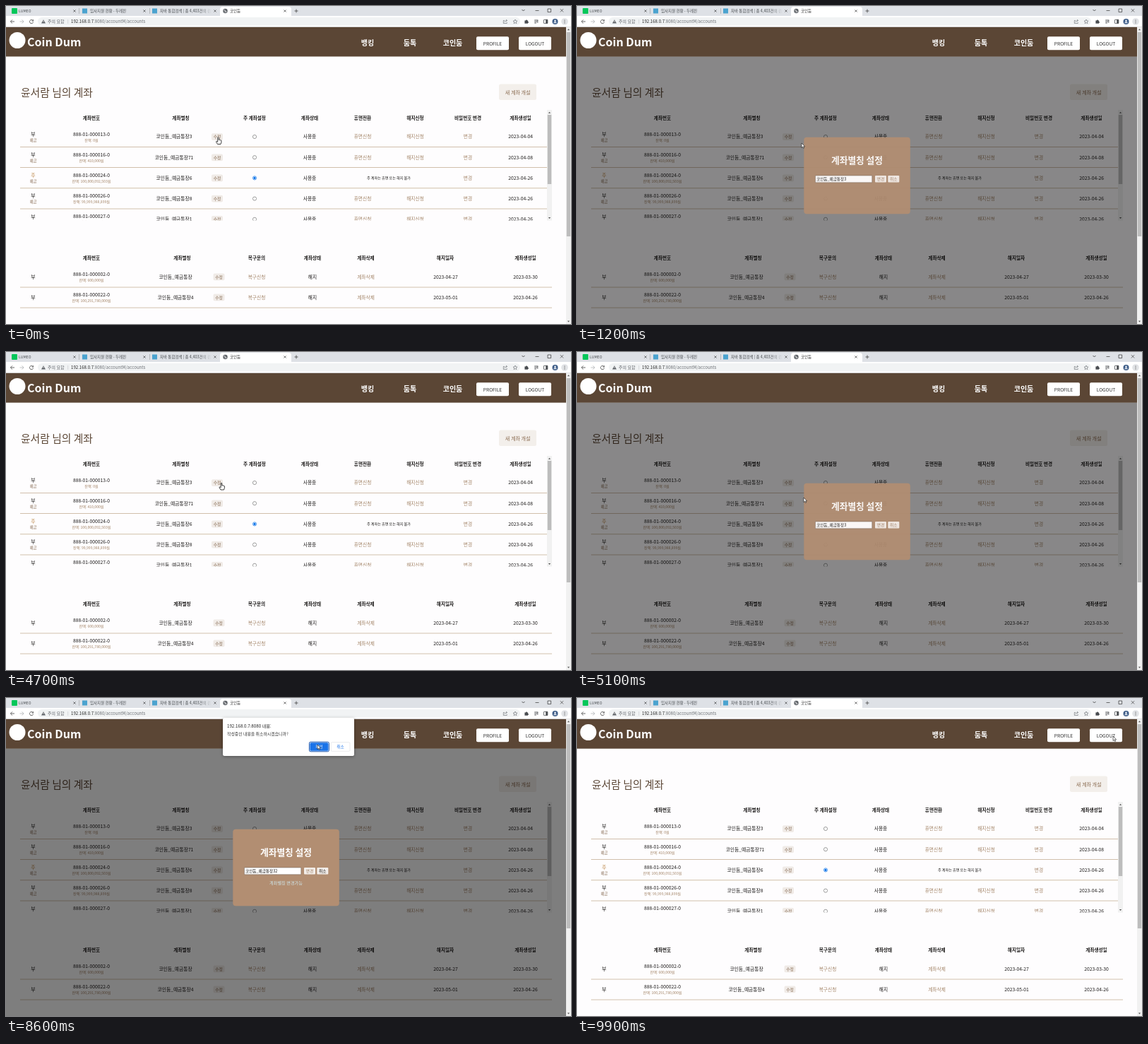
An HTML page with a canvas that plays this animation: 800x450 px, repeating every 10000 ms.

```html
<!DOCTYPE html>
<html lang="ko">
<head>
<meta charset="utf-8">
<title>코인둠</title>
<style>
html, body { margin: 0; width: 100%; height: 100%; overflow: hidden; background: #fff; }
canvas { display: block; width: 800px; height: 450px; }
</style>
</head>
<body>
<canvas id="stage"></canvas>
<script>
const cv = document.getElementById('stage');
const g = cv.getContext('2d');
const dpr = window.devicePixelRatio || 1;
cv.width = 800 * dpr;
cv.height = 450 * dpr;

const LOOP = 10000, STEP = 100;
const FONT = '"Noto Sans CJK KR","Noto Sans CJK JP","Noto Sans CJK SC",sans-serif';
const INK = '#1c1a19', BROWN = '#5b4635', TAN = '#a38467', GRAY = '#5f6368', BLUE = '#1a73e8';
const BRAND = '코인둠', ALIAS = BRAND + '_예금통장';

function text(s, x, y, size, color = INK, align = 'center', weight = 400) {
  g.font = `${weight} ${size}px ${FONT}`;
  g.textAlign = align;
  g.fillStyle = color;
  g.fillText(s, x, y + size * 0.37);
}
const left = (s, x, y, size, color, weight) => text(s, x, y, size, color, 'left', weight);
const bold = (s, x, y, size, color) => text(s, x, y, size, color, 'center', 700);

function rect(x, y, w, h, color) {
  g.fillStyle = color;
  g.fillRect(x, y, w, h);
}
function box(x, y, w, h, r, fill, edge, lw = 0.6) {
  g.beginPath();
  g.roundRect(x, y, w, h, r);
  if (fill) { g.fillStyle = fill; g.fill(); }
  if (edge) { g.strokeStyle = edge; g.lineWidth = lw; g.stroke(); }
}
function disc(x, y, r, fill, edge, lw = 0.7) {
  g.beginPath();
  g.arc(x, y, r, 0, 7);
  if (fill) { g.fillStyle = fill; g.fill(); }
  if (edge) { g.strokeStyle = edge; g.lineWidth = lw; g.stroke(); }
}
function path(d, x, y, edge, lw = 0.8, fill) {
  const p = new Path2D(d);
  g.save();
  g.translate(x, y);
  if (fill) { g.fillStyle = fill; g.fill(p); }
  if (edge) { g.strokeStyle = edge; g.lineWidth = lw; g.lineJoin = 'round'; g.stroke(p); }
  g.restore();
}
const cross = (x, y, r) => path(`M${-r} ${-r}L${r} ${r}M${r} ${-r}L${-r} ${r}`, x, y, '#444', 0.7);

function browser() {
  rect(0, 0, 800, 15, '#dee1e6');
  box(303, 1, 101, 18, 4, '#fff');
  rect(0, 14, 800, 15.5, '#fff');
  rect(0, 29, 800, 0.6, '#d5d7da');
  box(8, 3, 8, 8, 1, '#03c75a');
  left('LUMEO', 18, 7, 5.2, '#45494d');
  for (const x of [108, 207]) rect(x, 3.5, 7, 7, '#4ba3cf');
  left('입사지원 현황 - 두레핀', 119, 7, 5.5, '#45494d');
  const fade = g.createLinearGradient(276, 0, 291, 0);
  fade.addColorStop(0, '#45494d');
  fade.addColorStop(1, '#45494d00');
  left('자바 통합검색 | 총 4,403건의 검', 218, 7, 5.5, fade);
  disc(310.5, 7, 3.2, GRAY);
  path('M-2 -1Q0 -2 0 0T2 1M-1 2L0 1', 310.5, 7, '#fff', 0.8);
  left(BRAND, 317, 7, 5.5, '#333');
  for (const x of [97, 196, 296, 395]) cross(x, 7, 1.6);
  for (const x of [103, 203]) rect(x, 3, 0.6, 8, '#9a9da1');
  path('M-2.5 0H2.5M0 -2.5V2.5', 411, 7, '#444');
  path('M-2 -1L0 1L2 -1', 732.5, 6, '#333');
  path('M-2.5 0H2.5', 752, 6.5, '#333', 0.7);
  box(767, 4, 4.6, 4.6, 0, null, '#333', 0.7);
  cross(787, 6.3, 2.2);

  path('M3 0H-2.6M0 -2.6L-2.6 0L0 2.6', 9, 22, '#444');
  path('M-3 0H2.6M0 -2.6L2.6 0L0 2.6', 22.5, 22, '#b0b3b7');
  path('M2 -1.6A2.6 2.6 0 1 0 2.6 .7M2.6 -2.8V-.8H.6', 36, 22, '#444');
  box(45, 16, 683, 11.5, 5.75, '#f1f3f4');
  path('M0 -2.8L3 2.4H-3Z', 53, 22, null, 0, GRAY);
  rect(52.6, 20.7, 0.8, 2, '#fff');
  left('주의 요함', 59, 22, 6, GRAY);
  rect(87.5, 19, 0.6, 6, '#c3c6ca');
  left('192.168.0.7', 92, 22, 6.1, '#222');
  left(':8080/accountM/accounts', 92 + g.measureText('192.168.0.7').width, 22, 6.1, '#6b6f74');

  path('M-1 -1.5H-2.7V2.5H2.2V1M-1.2 1Q-1 -1.3 2.4 -1.5M1 -3L2.6 -1.5L1 0', 707, 22, GRAY, 0.6);
  path('M0 -3L.9 -1L3 -.8L1.4 .6L1.9 2.7L0 1.6L-1.9 2.7L-1.4 .6L-3 -.8L-.9 -1Z', 721, 22, GRAY, 0.6);
  path('M-2.6 -1.6H-1A1 1 0 0 1 1 -1.6H2V0A1 1 0 0 1 2 2V2.8H-2.6Z', 737, 22, null, 0, '#4a4d51');
  path('M-2.8 -2H2.4M-2.8 0H1M-2.8 2H0M1.8 -2V1.8', 751, 22, '#4a4d51', 0.9);
  box(761.5, 19.3, 5.4, 5.4, 0.6, null, '#4a4d51', 0.8);
  rect(764.2, 19.3, 2.7, 5.4, '#4a4d51');
  disc(777.5, 22, 4, '#3c5b86');
  disc(777.5, 20.9, 1.3, '#dfe6ef');
  path('M-2.2 2A2.2 1.9 0 0 1 2.2 2Z', 777.5, 22.2, null, 0, '#dfe6ef');
  disc(791, 22, 4.8, '#e1e3e6');
  for (const y of [20, 22, 24]) disc(791, y, 0.6, '#444');
}

function header() {
  rect(0, 29.5, 793, 42, BROWN);
  disc(16, 48.5, 11.5, '#fff');
  left('Coin Dum', 30, 51.5, 16, '#fff', 700);
  bold('뱅킹', 512, 52, 10, '#fff');
  bold('둠톡', 572, 52, 10, '#fff');
  bold(BRAND, 632.5, 52, 10, '#fff');
  box(666, 43.3, 46, 19, 2, '#fff');
  box(726, 43.3, 46, 19, 2, '#fff');
  text('PROFILE', 689, 53.3, 6.6, '#333');
  text('LOGOUT', 749, 53.3, 6.6, '#333');
}

function scrollbar(x, y0, y1, from, to) {
  rect(x, y0, 7, y1 - y0, '#f1f1f1');
  rect(x + 0.8, from, 5.4, to - from, '#bdbdbd');
  path('M-1.6 1L0 -1L1.6 1Z', x + 3.5, y0 + 3.8, null, 0, '#555');
  path('M-1.6 -1L0 1L1.6 -1Z', x + 3.5, y1 - 3.5, null, 0, '#555');
}

function editButton(x, y) {
  box(x - 8, y - 4.8, 16, 9.8, 2, '#f0ebe7');
  text('수정', x, y + 0.3, 5.8, '#866a52');
}

function account(no, sum, y) {
  text(`888-01-${no}-0`, 121, y - 3.8, 6.75);
  text(`잔액: ${sum}원`, 121, y + 4.8, 5.1, TAN);
}

const ACTIVE = [
  ['000013', '0', '3', '04-04'],
  ['000016', '410,000', '71', '04-08'],
  ['000024', '100,000,092,503', '6', '04-26'],
  ['000026', '99,999,988,899', '8', '04-26'],
  ['000027', '10,000', '1', '04-26']
];
const CLOSED = [
  ['000002', '600,000', '', '04-27', '03-30'],
  ['000022', '100,291,780,000', '4', '05-01', '04-26']
];

function heads(names, xs, y) {
  names.split(',').forEach((n, i) => bold(n, xs[i], y, 6.6));
}

function page() {
  rect(0, 71.5, 793, 378.5, '#fefdfe');
  left('윤서람 님의 계좌', 21, 123, 14.8, BROWN);
  box(698, 110.5, 53, 22.5, 2.5, '#f3efeb');
  text('새 계좌 개설', 724.7, 122, 7.1, '#8b6d52');

  heads('계좌번호,계좌별칭,주 계좌설정,계좌상태,휴면전환,해지신청,비밀번호 변경,계좌생성일',
    [121, 247.5, 352, 430, 505, 579.5, 654, 728.5], 159);
  g.save();
  g.beginPath();
  g.rect(20, 147, 746, 156.5);
  g.clip();
  ACTIVE.forEach(([no, sum, tail, date], i) => {
    const y = 185 + i * 29.2, main = i === 2;
    text(main ? '주' : '부', 38.5, y - 3.8, 6.8, main ? '#b9803f' : INK);
    text('예금', 38.5, y + 4.8, 5.2, '#866a52');
    account(no, sum, y);
    text(ALIAS + tail, 238, y, 6.75);
    editButton(299, y);
    disc(352, y, 2.6, '#fff', main ? '#0b72e8' : '#777', 0.7);
    if (main) disc(352, y, 1.6, '#0b72e8');
    text('사용중', 430, y, 6.7);
    if (main) {
      text('주 계좌는 휴면 또는 해지 불가', 542, y, 5.1);
    } else {
      text('휴면신청', 505, y, 6.7, TAN);
      text('해지신청', 579.5, y, 6.7, TAN);
    }
    text('변경', 654, y, 6.7, TAN);
    text('2023-' + date, 728.7, y, 6.75);
    rect(20, y + 14, 746, 0.8, '#c6b196');
  });
  g.restore();
  scrollbar(766, 147, 303.5, 154, 252);

  heads('계좌번호,계좌별칭,복구문의,계좌상태,계좌삭제,해지일자,계좌생성일',
    [121, 249.5, 355, 434, 509.5, 622, 735.5], 357);
  CLOSED.forEach(([no, sum, tail, end, start], i) => {
    const y = 383.3 + i * 29;
    text('부', 38.5, y, 6.8);
    account(no, sum, y);
    text(ALIAS + tail, 240, y, 6.75);
    editButton(301.5, y);
    text('복구신청', 355, y, 6.7, TAN);
    text('해지', 434, y, 6.7);
    text('계좌삭제', 509.5, y, 6.7, TAN);
    text('2023-' + end, 622.5, y, 6.75);
    text('2023-' + start, 735.5, y, 6.75);
    rect(20, y + 14.3, 753, 0.8, '#c6b196');
  });
}

function modal(alpha, typed, hover) {
  g.globalAlpha = alpha * 0.5;
  rect(0, 71.5, 793, 378.5, '#000');
  g.globalAlpha = alpha;
  box(321.3, 185.7, 150.5, 108.6, 4, '#b28e72');
  bold('계좌별칭 설정', 396.5, 218, 12.7, '#fff');
  box(337.5, 240, 80.3, 9.8, 0, '#fff', '#6f6259', 0.5);
  left(ALIAS + '3' + (typed ? '2' : ''), 339, 245, 5.6);
  box(422, 240, 16, 9.6, 1, '#f2ede9');
  box(440.3, 240, 16, 9.6, 1, '#f2ede9');
  text('변경', 430, 245, 5.7, '#a08066');
  text('취소', 448.3, 245, 5.7, hover ? INK : '#a08066');
  if (typed) text('계좌별칭 변경가능', 396.5, 261.5, 6.2, '#cfe6ea');
  g.globalAlpha = 1;
}

function dialog() {
  g.save();
  g.shadowColor = 'rgba(0,0,0,.35)';
  g.shadowBlur = 4 * dpr;
  g.shadowOffsetY = dpr;
  box(307, 28, 186, 54, 2.5, '#fff');
  g.restore();
  left('192.168.0.7:8080 내용:', 313, 39.3, 6.2, '#222');
  left('작성중인 내용을 취소하시겠습니까?', 313, 51.3, 5.9, '#333');
  box(429.4, 62.2, 28, 13.6, 2, '#fff', '#1b56ae', 1);
  box(430.4, 63.2, 26, 11.6, 1.5, BLUE);
  text('확인', 443.5, 69, 5.7, '#fff');
  box(460, 62.7, 27, 12.6, 1.5, '#fff', '#dadce0');
  text('취소', 473.5, 69, 5.7, BLUE);
}

// time, x, y of the pointer tip
const TRACK = [
  [900, 300.5, 185.5], [1200, 318, 194], [1600, 385, 232], [2000, 425, 243], [2600, 450, 241],
  [4000, 450, 241], [4700, 305, 185], [4800, 305, 185], [5100, 321, 206], [5600, 396, 243],
  [6100, 396, 243], [6500, 449, 242], [6700, 449, 242], [7100, 473, 67], [7200, 473, 67],
  [7700, 449, 242], [7900, 449, 242], [8400, 441, 66], [8700, 441, 66], [9400, 700, 58], [9900, 759, 54]
];

function pointer(t) {
  let i = TRACK.findIndex(k => k[0] > t);
  if (i === 0) return TRACK[0].slice(1);
  if (i < 0) return TRACK[TRACK.length - 1].slice(1);
  const [t0, x0, y0] = TRACK[i - 1], [t1, x1, y1] = TRACK[i];
  const p = (t - t0) / (t1 - t0);
  return [x0 + (x1 - x0) * p, y0 + (y1 - y0) * p];
}

const within = (x, y, x0, y0, x1, y1) => x >= x0 && x <= x1 && y >= y0 && y <= y1;

function cursor(x, y, kind) {
  if (kind === 'hand') {
    path('M-.8 .8Q0 -.5 .8 .8V4L2 3.8L3.2 4.2L4.4 4.8V7.5L3.5 10H-1L-3 6.8Q-3 5.4 -1.6 6.2L-.8 6.8Z',
      x, y, '#111', 0.8, '#fff');
  } else if (kind === 'beam') {
    path('M-1.3 -4H1.3M0 -4V4M-1.3 4H1.3', x, y + 2, '#111', 0.7);
  } else {
    path('M0 0V6.6L1.5 5.2L2.6 7.5L3.6 7L2.6 4.8H4.6Z', x, y, '#111', 0.6, '#fff');
  }
}

function fadeIn(t, start) {
  const p = Math.min(1, Math.max(0, (t - start) / 300));
  return 0.5 - Math.cos(p * Math.PI) / 2;
}

function draw(t) {
  g.setTransform(dpr, 0, 0, dpr, 0, 0);
  const first = t >= 1000 && t < 3700, second = t >= 4900 && t < 8700;
  const open = first || second;
  const asking = (t >= 6600 && t < 7200) || (t >= 7900 && t < 8700);
  const [x, y] = pointer(t);
  const onCancel = within(x, y, 440, 238, 457, 250);

  page();
  if (open) modal(fadeIn(t, first ? 950 : 4850), t >= 5800, onCancel || asking);
  header();
  scrollbar(793, 29.5, 450, 37, 326);
  browser();
  if (asking) dialog();

  let kind = 'arrow';
  if (open && !asking) {
    if (onCancel || within(x, y, 422, 238, 438, 250)) kind = 'hand';
    else if (within(x, y, 337, 239, 418, 250)) kind = 'beam';
  } else if (!open && within(x, y, 291, 180, 307, 191)) kind = 'hand';
  cursor(x, y, kind);
}

let shown = -1;
const begin = performance.now();
function tick() {
  const t = (performance.now() - begin) % LOOP;
  const step = Math.floor(t / STEP) * STEP;
  if (step !== shown) draw(shown = step);
  requestAnimationFrame(tick);
}
tick();
</script>
</body>
</html>
```
